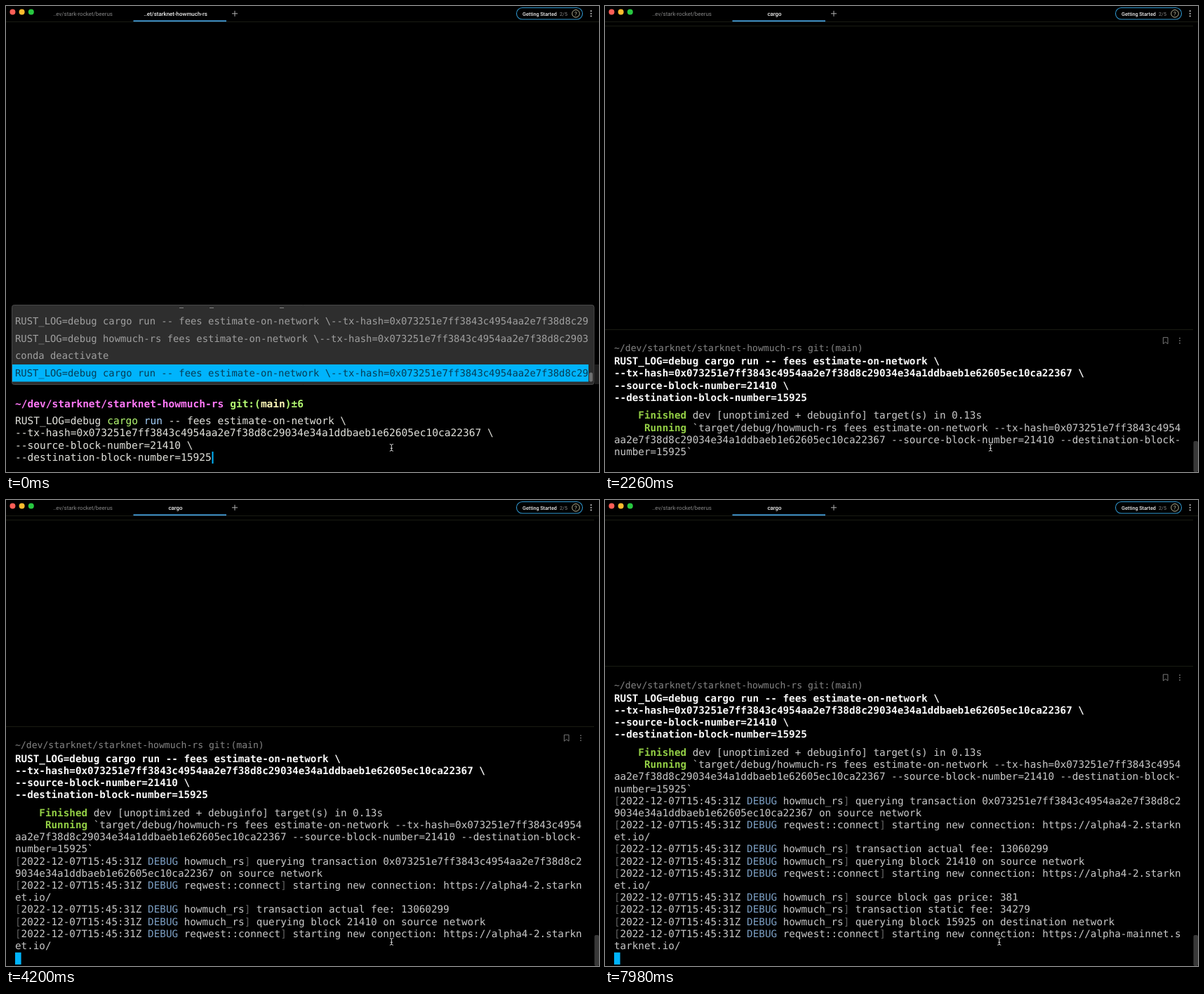
An HTML page with a canvas for the animation above (8000 ms loop, 845 by 663 pixels).

```html
<!DOCTYPE html>
<html lang="en">
<head>
<meta charset="utf-8">
<title>Terminal session</title>
<style>
  html, body { margin: 0; width: 100%; height: 100%; overflow: hidden; background: #000; }
  canvas { display: block; }
</style>
</head>
<body>
<canvas id="stage" width="845" height="663"></canvas>
<script>
const ctx = document.getElementById('stage').getContext('2d');
const LOOP = 8000;
const LEFT = 13;
const MONO = '"DejaVu Sans Mono", monospace';
const SANS = 'Roboto, sans-serif';
const ADVANCE = 0.602;
const SIZE = { prompt: 14.53, list: 13.85, out: 14.28, dir: 13.1 };
const ROW = 17.19;
const LAST_ROW = 634;

const C = {
  text: '#c9c9c9', white: '#fafafa', prompt: '#e2e2dc', dim: '#858585',
  green: '#b4fa72', done: '#93cf45', pink: '#ff78f8', cream: '#fdf8b8',
  sky: '#a5d0fa', debug: '#7c9fc4', bracket: '#626262',
  accent: '#00b4fc', line: '#191b12'
};

const HASH = '0x073251e7ff3843c4954aa2e7f38d8c29034e34a1ddbaeb1e62605ec10ca22367';
const DIR = '~/dev/starknet/starknet-howmuch-rs';
const RUN = 'RUST_LOG=debug cargo run -- fees estimate-on-network \\';
const ARGS = [`--tx-hash=${HASH} \\`, '--source-block-number=21410 \\', '--destination-block-number=15925'];
const COMMAND = [RUN, ...ARGS];

const log = (module, message) => [
  ['[', C.bracket], ['2022-12-07T15:45:31Z ', C.text], ['DEBUG', C.debug],
  [' ' + module, C.text], ['] ', C.bracket], [message, C.text]
];
const plain = s => [[s, C.text]];
const connect = host => log('reqwest::connect', 'starting new connection: https://' + host);
const OUTPUT = [
  [['    Finished', C.done, 'bold'], [' dev [unoptimized + debuginfo] target(s) in 0.13s', C.text]],
  [['     Running', C.done, 'bold'],
   [' `target/debug/howmuch-rs fees estimate-on-network --tx-hash=' + HASH.slice(0, 21), C.text]],
  plain(HASH.slice(21) + ' --source-block-number=21410 --destination-block-'),
  plain('number=15925`'),
  log('howmuch_rs', 'querying transaction ' + HASH.slice(0, 33)),
  plain(HASH.slice(33) + ' on source network'),
  connect('alpha4-2.starkn'),
  plain('et.io/'),
  log('howmuch_rs', 'transaction actual fee: 13060299'),
  log('howmuch_rs', 'querying block 21410 on source network'),
  connect('alpha4-2.starkn'),
  plain('et.io/'),
  log('howmuch_rs', 'source block gas price: 381'),
  log('howmuch_rs', 'transaction static fee: 34279'),
  log('howmuch_rs', 'querying block 15925 on destination network'),
  connect('alpha-mainnet.s'),
  plain('tarknet.io/')
];

// [start time, visible output rows]
const STEPS = [[1860, 4], [2640, 8], [3400, 12], [5160, 17]];

function rect(x, y, w, h, color) {
  ctx.fillStyle = color;
  ctx.fillRect(x, y, w, h);
}

function dot(x, y, r, color) {
  ctx.fillStyle = color;
  ctx.beginPath();
  ctx.arc(x, y, r, 0, 7);
  ctx.fill();
}

function path(points, color, width = 1) {
  ctx.strokeStyle = color;
  ctx.lineWidth = width;
  ctx.beginPath();
  points.forEach(([x, y], i) => i ? ctx.lineTo(x, y) : ctx.moveTo(x, y));
  ctx.stroke();
}

// Draws [text, color, weight] runs on one row centred at y.
function mono(runs, y, size) {
  let x = LEFT;
  ctx.textAlign = 'left';
  for (const [s, color, weight = 'normal'] of runs) {
    ctx.font = `${weight} ${size}px ${MONO}`;
    ctx.fillStyle = color;
    ctx.fillText(s, x, y + size * 0.35);
    x += s.length * size * ADVANCE;
  }
}

function label(s, x, size, color, weight = 400, align = 'center', y = 13.5) {
  ctx.font = `${weight} ${size}px ${SANS}`;
  ctx.textAlign = align;
  ctx.fillStyle = color;
  ctx.fillText(s, x, y);
}

function kebab(x, y, gap, r, color) {
  for (let i = -1; i < 2; i++) dot(x, y + i * gap, r, color);
}

function tabBar(title) {
  dot(9.4, 8.6, 4, '#ff5f57');
  dot(22.6, 8.6, 4, '#febc2e');
  dot(35.8, 8.6, 4, '#28c840');
  label('..ev/stark-rocket/beerus', 109.5, 7.95, '#858585');
  label(title, 241.5, 7.95, '#f0f0f0', 500);
  rect(0, 22, 845, 1, C.line);
  rect(181.5, 20.4, 132.5, 1.8, '#449fdc');
  path([[322, 10.8], [330, 10.8]], '#b0b0b0');
  path([[326, 6.8], [326, 14.8]], '#b0b0b0');

  ctx.strokeStyle = '#2f97cf';
  ctx.lineWidth = 1.1;
  ctx.beginPath();
  ctx.roundRect(727.5, 2.5, 94, 16.5, 8.2);
  ctx.stroke();
  label('Getting Started', 736, 7.2, '#f0f0f0', 500, 'left');
  label('2/5', 789, 7.2, '#8c8c8c', 400, 'left');
  ctx.strokeStyle = '#c9c6a4';
  ctx.lineWidth = 0.9;
  ctx.beginPath();
  ctx.arc(812, 10.8, 5.3, 0, 7);
  ctx.stroke();
  label('?', 812, 8, '#c9c6a4');
  kebab(833.7, 10.8, 3.6, 1.1, '#b0b0b0');
}

function history() {
  ctx.fillStyle = '#2e2e2e';
  ctx.strokeStyle = '#484848';
  ctx.lineWidth = 1;
  ctx.beginPath();
  ctx.roundRect(8.5, 425.5, 829.5, 113, 3);
  ctx.fill();
  ctx.stroke();
  for (const x of [247, 290, 390]) rect(x, 429, 6, 1, '#858585');
  rect(9, 510, 821, 24.5, C.accent);

  ctx.save();
  ctx.beginPath();
  ctx.rect(9, 429, 821, 108);
  ctx.clip();
  const rows = [
    RUN + ARGS[0],
    'RUST_LOG=debug howmuch-rs fees estimate-on-network \\' + ARGS[0],
    'conda deactivate',
    RUN + ARGS[0]
  ];
  rows.forEach((s, i) => mono([[s, i === 3 ? '#073c55' : '#a0a0a0']], 448 + i * 24.7, SIZE.list));
  ctx.restore();

  ctx.fillStyle = '#6e6e6e';
  ctx.beginPath();
  ctx.roundRect(831, 521.5, 5, 13, 2);
  ctx.fill();
  rect(839, 510, 6, 28, '#1d1d1d');
}

function promptView(t) {
  history();
  mono([
    [DIR + ' ', C.pink, 'bold'], ['git:(', C.green, 'bold'],
    ['main', C.cream, 'bold'], [')±6', C.green, 'bold']
  ], 566, SIZE.prompt);
  mono([
    ['RUST_LOG=debug ', C.prompt], ['cargo', C.green], [' ', C.prompt], ['run', C.sky],
    [' -- fees estimate-on-network \\', C.prompt]
  ], 590, SIZE.prompt);
  ARGS.forEach((s, i) => mono([[s, C.prompt]], 607.4 + i * 17.45, SIZE.prompt));
  if ((t + 100) % 1000 < 500) rect(293.5, 634, 2, 17, C.accent);
}

function blockView(count) {
  const top = LAST_ROW - (count - 1) * ROW;
  const head = top - 96;
  rect(0, 28, 838, 1, C.line);
  rect(0, Math.round(head - 26.5), 838, 1, C.line);

  const y = head - 10.3;
  path([[795.4, y - 4.5], [802, y - 4.5], [802, y + 4.5], [798.7, y + 2],
        [795.4, y + 4.5], [795.4, y - 4.5]], '#777');
  kebab(819, y, 3.5, 0.9, '#777');

  mono([[DIR + ' git:(main)', C.dim]], head, SIZE.dir);
  COMMAND.forEach((s, i) => mono([[s, C.white, 'bold']], head + 18.8 + i * ROW, SIZE.out));
  OUTPUT.slice(0, count).forEach((runs, i) => mono(runs, top + i * ROW, SIZE.out));
  if (count > 4) rect(LEFT, 643.7, SIZE.out * ADVANCE, ROW, C.accent);

  ctx.fillStyle = '#393939';
  ctx.beginPath();
  ctx.roundRect(838.5, 619, 6.5, 44, 2);
  ctx.fill();
}

function pointer(t) {
  const p = Math.min(1, Math.max(0, (t - 6200) / 700));
  const x = 549.3 + 12.5 * p * p * (3 - 2 * p);
  const y = 628.3;
  const arms = s => [[x - 2.5, y + 5 * s], [x, y + 4 * s], [x + 2.5, y + 5 * s]];
  for (const [color, width] of [['#000', 2.6], ['#dedede', 1]]) {
    path(arms(-1), color, width);
    path(arms(1), color, width);
    path([[x, y - 4], [x, y + 4]], color, width);
    path([[x - 1.5, y + 1], [x + 1.5, y + 1]], color, width);
  }
}

const start = performance.now();

function draw(now) {
  const t = Math.max(0, now - start) % LOOP;
  const step = STEPS.filter(s => s[0] <= t).pop();
  ctx.textRendering = 'geometricPrecision';
  rect(0, 0, 845, 663, '#000');
  tabBar(step ? 'cargo' : '..et/starknet-howmuch-rs');
  if (step) blockView(step[1]);
  else promptView(t);
  pointer(t);
  requestAnimationFrame(draw);
}

draw(start);
</script>
</body>
</html>
```
